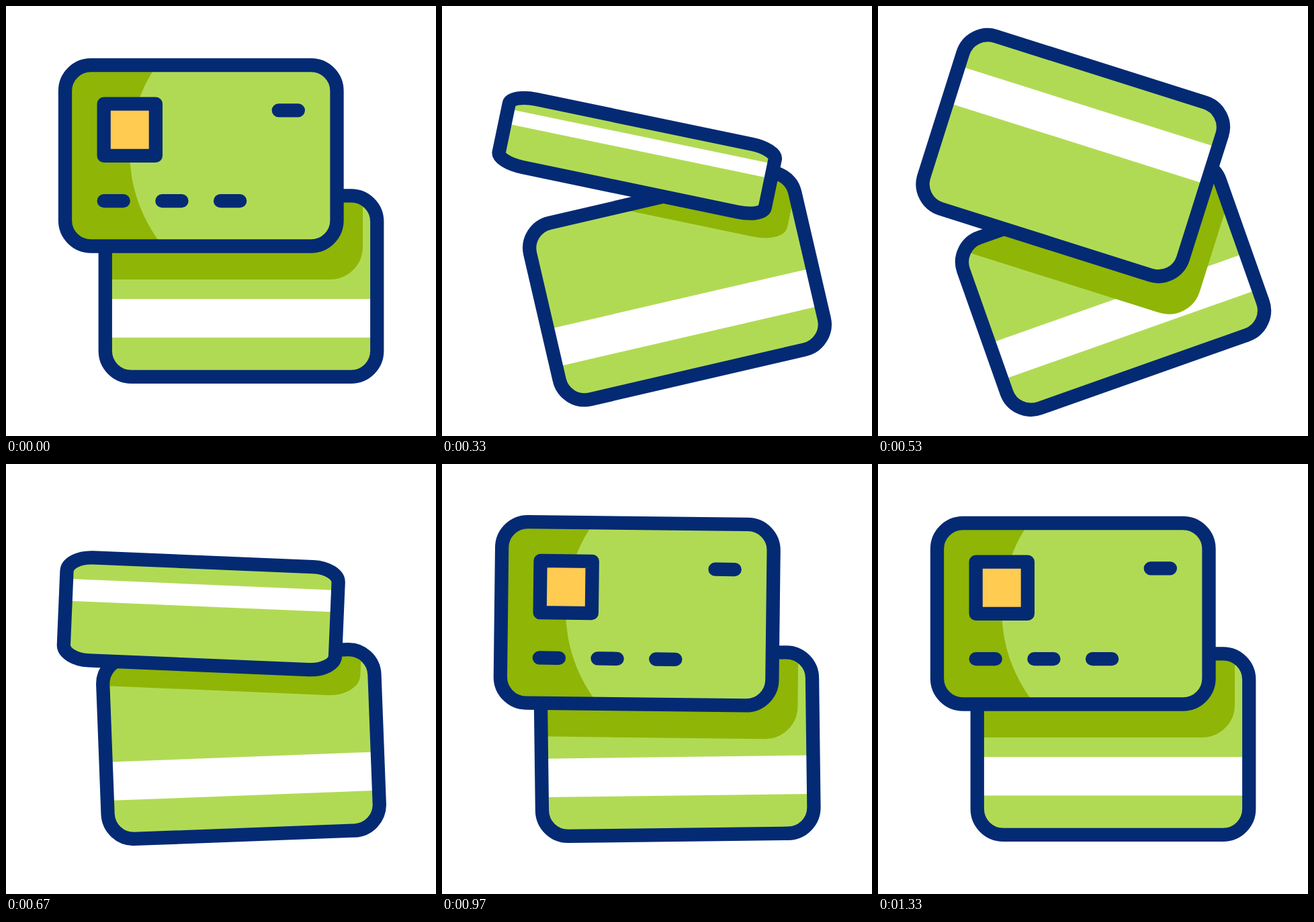
Write an HTML page that moves like this. It is 640 px wide and 640 px high and loops after 2000 ms.

```html
<!DOCTYPE html>
<html lang="en">
<head>
<meta charset="utf-8">
<title>Flipping cards</title>
<style>
  html, body { margin: 0; width: 100%; height: 100%; overflow: hidden; background: #fff; }
  svg { display: block; width: 100%; height: 100%; }
  .light { fill: #b1da54; }
  .dark { fill: #8fb507; }
  .shade { fill: #8fb507; stroke: #8fb507; stroke-width: 20.3; stroke-linejoin: round; }
  .line {
    fill: none; stroke: #042a74; stroke-width: 20.3;
    stroke-linecap: round; stroke-linejoin: round;
    vector-effect: non-scaling-stroke;
  }
  .band { fill: #fff; }
  .chip { fill: #ffcb50; }
</style>
</head>
<body>
<svg viewBox="0 0 640 640">
  <defs>
    <rect id="card" x="-202.25" y="-134.75" width="404.5" height="269.5" rx="38.5"/>
    <rect id="band" x="-202.25" y="19" width="404.5" height="57.4"/>
    <clipPath id="inCard"><use href="#card"/></clipPath>
    <clipPath id="inBack"><use href="#card" id="backClip"/></clipPath>
  </defs>

  <g id="backFill">
    <use href="#card" class="light"/>
    <use href="#band" class="band"/>
  </g>
  <g clip-path="url(#inBack)"><rect id="shade" class="shade"/></g>
  <g id="backLine">
    <rect class="line" x="-202.25" y="-134.75" width="404.5" height="269.5" rx="38.5"/>
  </g>

  <g id="front">
    <g id="face">
      <use href="#card" class="dark"/>
      <g clip-path="url(#inCard)"><circle class="light" cx="118.75" cy="-6" r="225"/></g>
      <rect class="line chip" style="fill:#ffcb50" x="-144.6" y="-77.1" width="77.2" height="77.2"/>
      <path class="line" d="M-144.6 67.4h29.1M-57.9 67.4h29.1M28.8 67.4h29.1M115.5 -67.4h29.1"/>
    </g>
    <g id="reverse">
      <use href="#card" class="light"/>
      <use href="#band" class="band"/>
    </g>
    <rect class="line" x="-202.25" y="-134.75" width="404.5" height="269.5" rx="38.5"/>
  </g>
</svg>
<script>
const LOOP = 2000, FPS = 30;
const FRONT = "translate(290.25 222.75)", BACK = "translate(350 417.1)";
const $ = id => document.getElementById(id);
const set = (id, attrs) => {
  for (const k in attrs) $(id).setAttribute(k, attrs[k]);
};

// Keys: [step, front angle, back angle, ease strength]
const swing = [
  [0, 0, 0],
  [16, 17.54, -19.47, 0.78],
  [23, -7.4, 9.05, 1],
  [32, 3.5, -4.15, 1],
  [40, 0, 0, 1]
];

function angles(n) {
  const i = swing.findIndex(k => k[0] >= n);
  if (i < 0) return [0, 0];
  if (i === 0) return [0, 0];
  const a = swing[i - 1], b = swing[i];
  const x = (n - a[0]) / (b[0] - a[0]);
  const s = x + (x * x * (3 - 2 * x) - x) * b[3];
  return [1, 2].map(j => a[j] + (b[j] - a[j]) * s);
}

// Half a turn over 16 steps, then back over 13
function flip(n) {
  const turn = n < 16 ? n / 16 : Math.max(0, 1 - (n - 16) / 13);
  return Math.cos(Math.PI * turn);
}

function draw(ms) {
  const n = Math.floor(ms * FPS / 1000 + 0.11);
  const [front, back] = angles(n);
  const k = flip(n), size = Math.max(Math.abs(k), 0.01);
  const up = k > -0.001;
  const backPose = `${BACK} rotate(${back})`;

  set("backFill", { transform: backPose });
  set("backLine", { transform: backPose });
  set("backClip", { transform: backPose });

  const half = 164.5 * size + 9.65;
  set("shade", {
    x: -230.6, y: -half, width: 461.2, height: 2 * half,
    rx: 38.5, ry: 38.5 * size,
    transform: `${FRONT} rotate(${front})`
  });

  set("front", {
    transform: `${FRONT} rotate(${front}) scale(1 ${up ? size : -size})`
  });
  set("face", { visibility: up ? "visible" : "hidden" });
  set("reverse", { visibility: up ? "hidden" : "visible" });
}

const start = performance.now();
function tick() {
  draw((performance.now() - start) % LOOP);
  requestAnimationFrame(tick);
}
draw(0);
requestAnimationFrame(tick);
</script>
</body>
</html>
```
